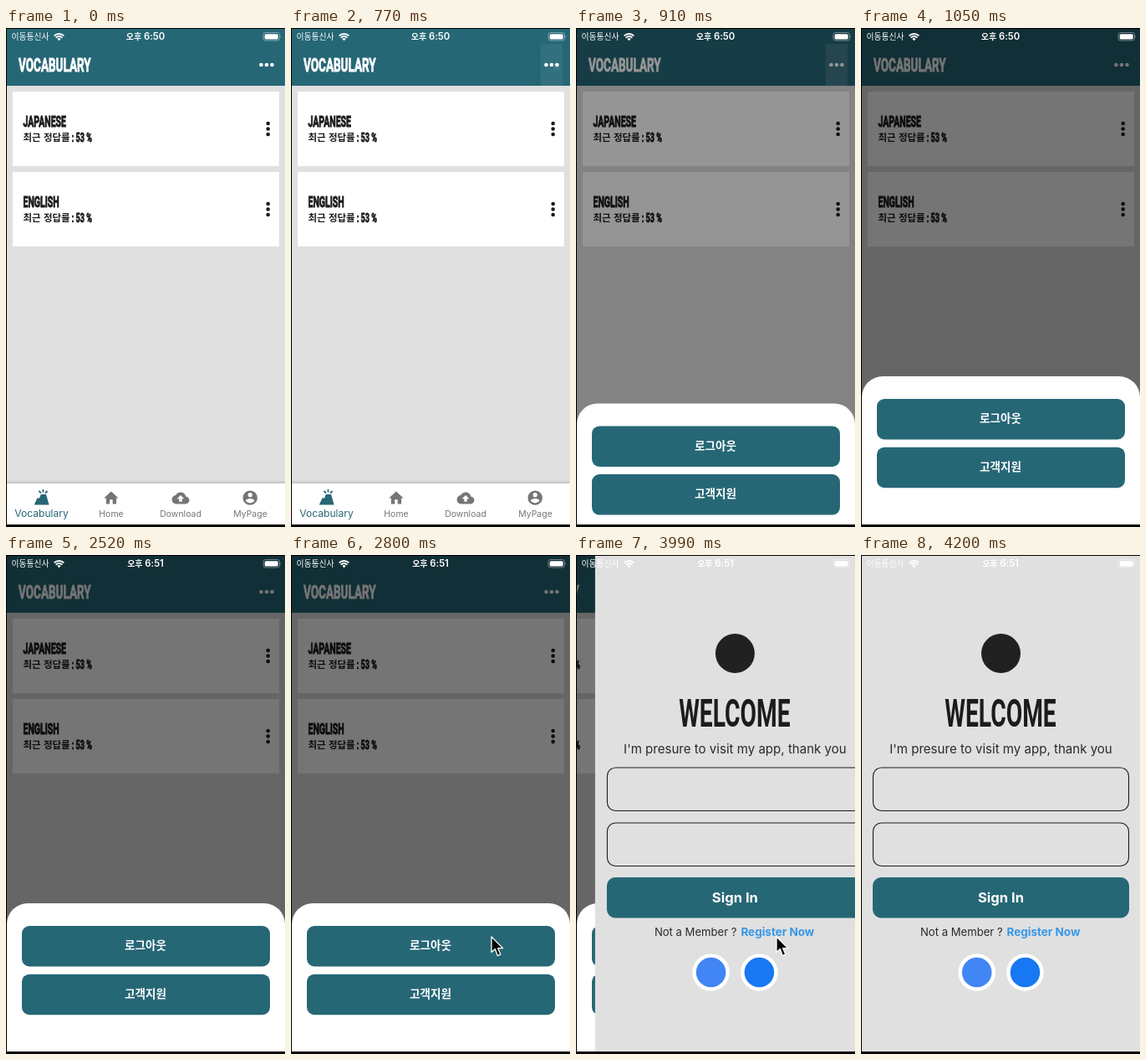
Write an HTML page that moves like this. It is 334 by 596 pixels and loops after 5390 ms.

```html
<!DOCTYPE html>
<html lang="ko">
<head>
<meta charset="utf-8">
<title>Vocabulary</title>
<style>
  html, body { margin: 0; width: 100%; height: 100%; overflow: hidden; background: #000; }
  svg { display: block; width: 334px; height: 596px; }
  text { font-family: Inter, "Noto Sans CJK KR", sans-serif; }
  .ko { font-family: "Noto Sans CJK KR", "Noto Sans CJK", "Noto Sans KR", sans-serif; }
  .mid { text-anchor: middle; }
  .narrow { font-family: Roboto, sans-serif; font-weight: 700; }
  .heavy { stroke: currentColor; stroke-width: .9px; }
  .tab { font-size: 10.5px; fill: #757575; text-anchor: middle; }
</style>
</head>
<body>
<svg viewBox="0 0 334 596">
  <defs>
    <linearGradient id="lift" x1="0" y1="0" x2="0" y2="1">
      <stop offset="0" stop-color="#000" stop-opacity="0"/>
      <stop offset="1" stop-color="#000" stop-opacity=".14"/>
    </linearGradient>
    <clipPath id="menuArea"><rect x="299" y="19" width="26" height="50"/></clipPath>
  </defs>

  <g id="home">
    <rect width="334" height="596" fill="#e0e0e0"/>
    <rect width="334" height="69" fill="#266776"/>
    <g id="press" clip-path="url(#menuArea)" fill="#fff">
      <rect x="299" y="19" width="26" height="50" fill-opacity=".06"/>
      <circle id="ripple" cx="318" cy="47" fill-opacity=".06"/>
    </g>
    <g id="title"></g>
    <g fill="#fff">
      <circle cx="305.5" cy="44" r="2.3"/><circle cx="312" cy="44" r="2.3"/><circle cx="318.5" cy="44" r="2.3"/>
    </g>
    <g id="cards"></g>
    <rect y="540" width="334" height="4" fill="url(#lift)"/>
    <rect y="544" width="334" height="52" fill="#fff"/>
    <path fill="#266776" transform="translate(32 550) scale(.89)" d="M18 8h-7l-2 5H6l-4 9h20zM13 1h2v4h-2zM16.1 5.5l2.8-2.9 1.5 1.5-2.9 2.8zM7.6 4l1.5-1.4 2.8 2.9-1.4 1.4z"/>
    <g fill="#757575">
      <path transform="translate(115.5 551) scale(.87)" d="M10 20v-6h4v6h5v-8h3L12 3 2 12h3v8z"/>
      <path transform="translate(198.6 551) scale(.87)" d="M19.35 10.04C18.67 6.59 15.64 4 12 4 9.11 4 6.6 5.64 5.35 8.04 2.34 8.36 0 10.91 0 14c0 3.31 2.69 6 6 6h13c2.76 0 5-2.24 5-5 0-2.64-2.05-4.78-4.65-4.96zM14 13v4h-4v-4H7l5-5 5 5z"/>
      <path transform="translate(281.8 550.7) scale(.87)" d="M12 2a10 10 0 1 0 0 20 10 10 0 0 0 0-20zm0 3a3 3 0 1 1 0 6 3 3 0 0 1 0-6zm0 14.2c-2.5 0-4.71-1.28-6-3.22.03-1.99 4-3.08 6-3.08s5.97 1.09 6 3.08c-1.29 1.94-3.5 3.22-6 3.22z"/>
    </g>
    <text class="mid" x="42.5" y="583.5" font-size="12.1" fill="#266776">Vocabulary</text>
    <text class="tab" x="126" y="584">Home</text>
    <text class="tab" x="209" y="584">Download</text>
    <text class="tab" x="292.5" y="584">MyPage</text>
  </g>

  <rect id="dim" width="334" height="596"/>

  <g id="sheet">
    <path d="M1 180V25A25 25 0 0 1 26 0H309A25 25 0 0 1 334 25V180z" fill="#fff"/>
    <g id="actions"></g>
  </g>

  <g id="login">
    <rect width="334" height="596" fill="#e0e0e0"/>
    <circle cx="167.5" cy="117.5" r="23.5" fill="#212121"/>
    <g id="welcome"></g>
    <text class="mid" x="167.5" y="236.5" font-size="15.07" fill="#2a2a2a">I'm presure to visit my app, thank you</text>
    <g fill="none" stroke="#1c1c1c" stroke-width="1.1">
      <rect x="14.5" y="254" width="306" height="51.5" rx="10"/>
      <rect x="14.5" y="320" width="306" height="51.5" rx="10"/>
    </g>
    <rect x="14" y="385" width="307" height="48.5" rx="10" fill="#266776"/>
    <text class="mid" x="167.5" y="415.3" font-size="16.6" font-weight="700" fill="#fff">Sign In</text>
    <text x="71" y="455" font-size="13.1" fill="#2a2a2a">Not a Member ?</text>
    <text x="174.5" y="455" font-size="13.5" font-weight="700" fill="#3797e8">Register Now</text>
    <circle cx="138.7" cy="498.5" r="22.3" fill="#fff"/>
    <circle cx="138.7" cy="498.5" r="17.8" fill="#4285f4"/>
    <circle cx="196.5" cy="498.5" r="22.3" fill="#fff"/>
    <circle cx="196.5" cy="498.5" r="17.8" fill="#1877f2"/>
  </g>

  <g id="status" fill="#fff">
    <text class="ko" x="6.5" y="14" font-size="9.8">이동통신사</text>
    <g fill="none" stroke="#fff" stroke-width="1.8">
      <path d="M57.6 9.4A8.4 8.4 0 0 1 69.4 9.4M59.6 11.6A5.5 5.5 0 0 1 67.4 11.6"/>
    </g>
    <path d="M63.5 15.3L61.4 13.1A3 3 0 0 1 65.6 13.1z"/>
    <text class="mid" x="167" y="14.3" font-size="11.3" font-weight="600"><tspan class="ko" font-size="10">오후 </tspan><tspan id="clock"></tspan></text>
    <rect x="308" y="5.5" width="19.5" height="9.5" rx="2.8" fill="none" stroke="#fff" stroke-opacity=".4"/>
    <rect x="309.7" y="7.2" width="16" height="6.2" rx="1.5"/>
    <path d="M328.6 8.6q1.6 1.6 0 3.4z" fill-opacity=".5"/>
  </g>

  <path id="cursor" fill="#000" stroke="#fff" stroke-width="1.3" stroke-linejoin="round"
    d="M240 456V474.5L244.3 470.6L247.3 478.6L250.8 477.1L247.6 469.6H253.6z"/>

  <path d="M0 0H334V1H1V593H334V596H0z"/>
</svg>
<script>
const LOOP = 5390, STEP = 70;
const SHEET_TOP = 416, SHEET_HEIGHT = 178;
const $ = id => document.getElementById(id);

// One shared narrowing gives all headings a condensed face.
const narrow = (x, y, size, color, label, cls = 'heavy') =>
  `<text class="narrow ${cls}" transform="translate(${x} ${y}) scale(.6 1)"
    font-size="${size}" fill="${color}" color="${color}">${label}</text>`;

const card = (y, name) => `
  <rect x="8" y="${y}" width="319" height="89" fill="#fff"/>
  ${narrow(20.5, y + 42.3, 17.5, '#1c1c1c', name)}
  <text class="ko" x="20.5" y="${y + 59}" font-size="11.5" font-weight="700" fill="#1c1c1c">최근 정답률</text>
  ${narrow(78.8, y + 59.7, 15, '#1c1c1c', ': 53 %')}
  ${[38, 44.5, 51].map(d => `<circle cx="313.7" cy="${y + d}" r="2.3" fill="#1c1c1c"/>`).join('')}`;

const action = (y, label) => `
  <rect x="19" y="${y}" width="297" height="48.5" rx="9" fill="#266776"/>
  <text class="ko mid" x="167" y="${y + 28.3}" font-size="13.6" font-weight="700" fill="#fff">${label}</text>`;

$('title').innerHTML = narrow(15, 52, 22.5, '#fff', 'VOCABULARY');
$('cards').innerHTML = card(76, 'JAPANESE') + card(172, 'ENGLISH');
$('actions').innerHTML = action(27, '로그아웃') + action(84.7, '고객지원');
$('welcome').innerHTML = narrow(167, 205, 47, '#1c1c1c', 'WELCOME', 'mid');

function bezier(x1, y1, x2, y2) {
  const at = (a, b, u) => 3 * a * u * (1 - u) ** 2 + 3 * b * u * u * (1 - u) + u ** 3;
  return x => {
    if (x <= 0) return 0;
    if (x >= 1) return 1;
    let low = 0, high = 1;
    for (let i = 0; i < 24; i++) {
      const mid = (low + high) / 2;
      if (at(x1, x2, mid) < x) low = mid; else high = mid;
    }
    return at(y1, y2, low);
  };
}
const rise = bezier(0, 0, .2, 1);
const fade = bezier(.25, .1, .25, 1);
const slide = bezier(.35, .91, .33, .97);

const show = (id, on) => $(id).style.display = on ? '' : 'none';
const move = (id, x, y) => $(id).setAttribute('transform', `translate(${x} ${y})`);

function draw(now) {
  const t = Math.floor((now % LOOP) / STEP) * STEP;
  const open = (t - 792) / 250;
  const push = slide((t - 3780) / 400);

  show('press', t >= 700 && t < 1050);
  $('press').setAttribute('opacity', t < 770 ? .4 : 1);
  $('ripple').setAttribute('r', Math.max(0, (t - 700) / 70) ** 2 * 4);

  $('dim').setAttribute('opacity', .54 * fade(open));
  move('sheet', 0, SHEET_TOP + SHEET_HEIGHT * (1 - rise(open)));
  show('sheet', open > 0);

  move('home', -105 * push, 0);
  move('login', 334 * (1 - push), 0);
  show('login', push > 0);

  $('clock').textContent = t < 2520 ? '6:50' : '6:51';
  show('cursor', t >= 2800 && t < 4200);
}

let start;
function tick(now) {
  start ??= now;
  draw(now - start);
  requestAnimationFrame(tick);
}
draw(0);
requestAnimationFrame(tick);
</script>
</body>
</html>
```
